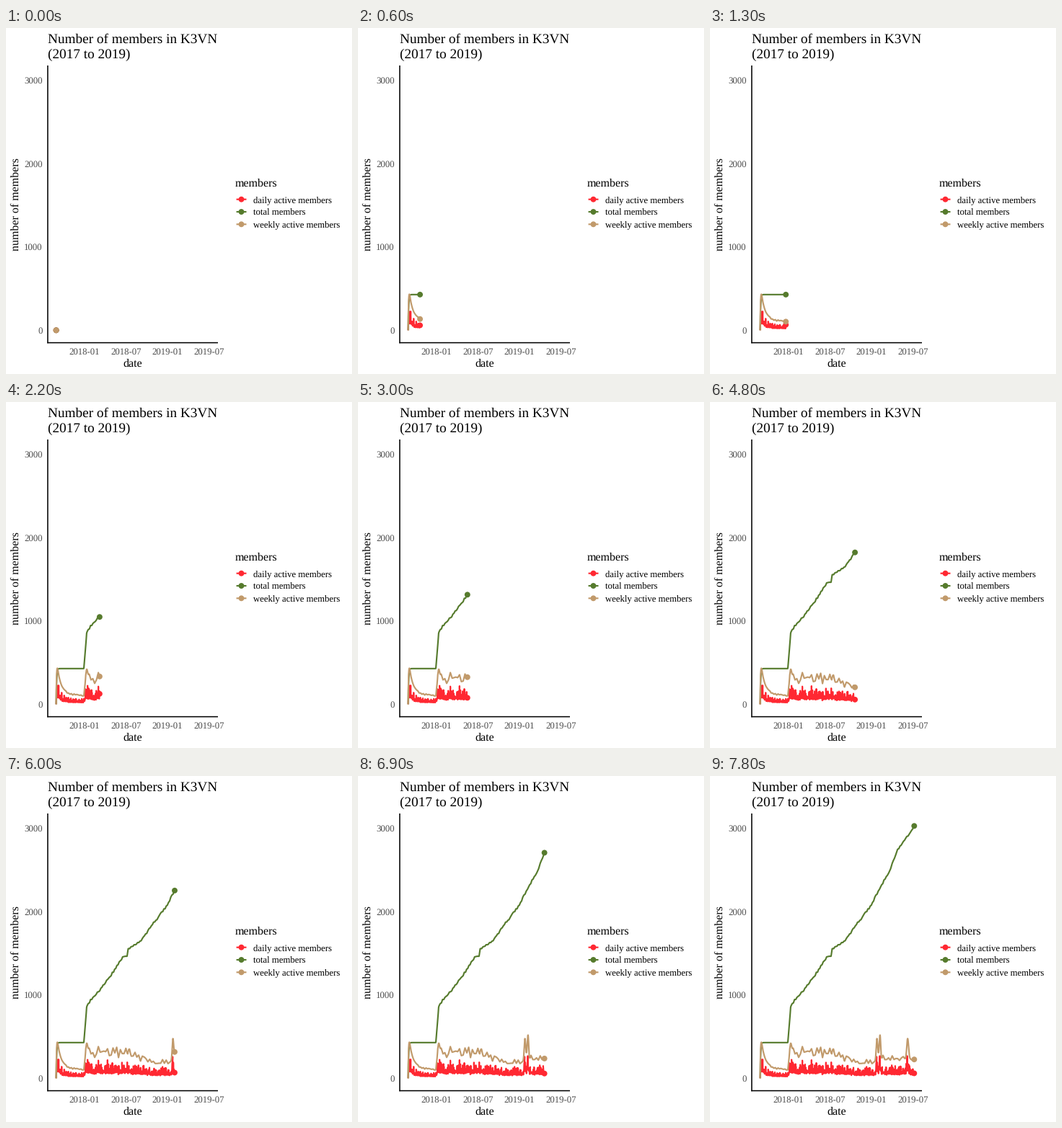
These frames come from a looping animation (480 by 480 pixels, 10 s). A matplotlib script:

```python
import matplotlib.pyplot as plt
import numpy as np
from matplotlib.animation import FuncAnimation

SIZE, FRAMES, STEP_MS, REVEAL = 480, 100, 100, 78
RED, GREEN, TAN, GREY = "#FF2832", "#567B2D", "#C19A6B", "#4D4D4D"
X0, X1, Y0, PX_PER_MEMBER = 69.6, 283.3, 419.3, 0.1156
DAYS, RELAUNCH = 672, 121

plt.rcParams["font.family"] = "Liberation Serif"
plt.rcParams["text.hinting"] = "none"

# At 72 dpi one point equals one pixel, so everything is laid out in pixels.
fig = plt.figure(figsize=(SIZE / 72, SIZE / 72), dpi=72, facecolor="white")
ax = fig.add_axes([0, 0, 1, 1])
ax.set(xlim=(0, SIZE), ylim=(SIZE, 0))
ax.axis("off")

rng = np.random.default_rng(5)
day = np.arange(DAYS + 1)
xs = np.linspace(X0, X1, DAYS + 1)
launch = 1 - np.exp(-day / 2)


def to_y(members):
    return Y0 - PX_PER_MEMBER * members


def wobble(step):
    """Seeded noise in -1..1, joined by straight lines every few days."""
    knots = np.arange(0, DAYS + step, step)
    return np.interp(day, knots, rng.uniform(-1, 1, knots.size))


def bump(centre, height, width):
    return height * np.exp(-((day - centre) / width) ** 2 / 2)


def total_members():
    growth = np.interp(
        day,
        [RELAUNCH, 133, 149, 190, 253, 290, 309, 314, 372, 413, 479, 517,
         568, 599, 630, DAYS],
        [428, 850, 937, 1057, 1291, 1451, 1467, 1551, 1650, 1820, 2053, 2255,
         2511, 2736, 2857, 3028])
    steps = np.maximum.accumulate(growth + 12 * wobble(5))
    steps[-1] = growth[-1]
    return np.where(day < RELAUNCH, 428 * launch, steps)


def weekly_members():
    fade = launch * (110 + 295 * np.exp(-(day - 8) / 17)) + 12 * wobble(6)
    level = np.interp(day, [RELAUNCH, 129, 330, 380, 480, 510, DAYS],
                      [110, 320, 295, 225, 195, 250, 215])
    swing = np.interp(day, [RELAUNCH, 135, 320, 370], [10, 75, 75, 35])
    peaks = (bump(133, 90, 3) + bump(316, 70, 5) + bump(509, 220, 3)
             + bump(523, 270, 3) + bump(643, 265, 4))
    return np.where(day < RELAUNCH, fade * (day > 0),
                    level + swing * wobble(8) + peaks)


def daily_members(weekly):
    luck = rng.random(day.size)
    share = np.where(day % 7 < 5, 0.26 + 0.38 * luck ** 3, 0.17 + 0.07 * luck)
    return weekly * share


def label(x, y, text, size, color="black", ha="left", **kw):
    ax.text(x, y, text, fontsize=size, color=color, ha=ha, va="baseline", **kw)


def stroke(x, y, color, width=2.13):
    return ax.plot(x, y, color=color, lw=width, solid_capstyle="butt",
                   solid_joinstyle="round", zorder=2, snap=False)[0]


def dot(x, y, color):
    return ax.add_patch(plt.Circle((x, y), 3.95, fc=color, lw=0, zorder=3))


label(57.9, 21, "Number of members in K3VN", 19.2)
label(57.9, 42, "(2017 to 2019)", 19.2)
label(176, 469.4, "date", 16, ha="center")
label(18.2, 244.4, "number of members", 16, ha="center", rotation=90,
      rotation_mode="anchor")
for n in range(0, 4000, 1000):
    label(50.6, to_y(n) + 4.4, str(n), 12.8, GREY, "right")
for i, text in enumerate(["2018-01", "2018-07", "2019-01", "2019-07"]):
    label(108.5 + 57.8 * i, 453.3, text, 12.8, GREY, "center")
stroke([57.9, 57.9], [52, 437.3], "black", 1.55)
stroke([57.2, 294], [436.6, 436.6], "black", 1.55)

label(317.8, 220, "members", 16)
total, weekly = total_members(), weekly_members()
series = []
for i, (name, color, members) in enumerate([
        ("daily active members", RED, daily_members(weekly)),
        ("total members", GREEN, total),
        ("weekly active members", TAN, weekly)]):
    y = 237.7 + 17.3 * i
    stroke([319.6, 333.5], [y, y], color)
    dot(326.5, y, color)
    label(343, y + 4.1, name, 12.8)
    series.append((to_y(members), stroke([], [], color), dot(X0, Y0, color)))


def update(frame):
    x = X0 + (X1 - X0) * min(frame / REVEAL, 1)
    past = xs < x
    for ys, line, head in series:
        y = np.interp(x, xs, ys)
        line.set_data(np.append(xs[past], x), np.append(ys[past], y))
        head.center = x, y
    return [artist for s in series for artist in s[1:]]


anim = FuncAnimation(fig, update, frames=FRAMES, interval=STEP_MS,
                     repeat=True, repeat_delay=0)
plt.show()
```
